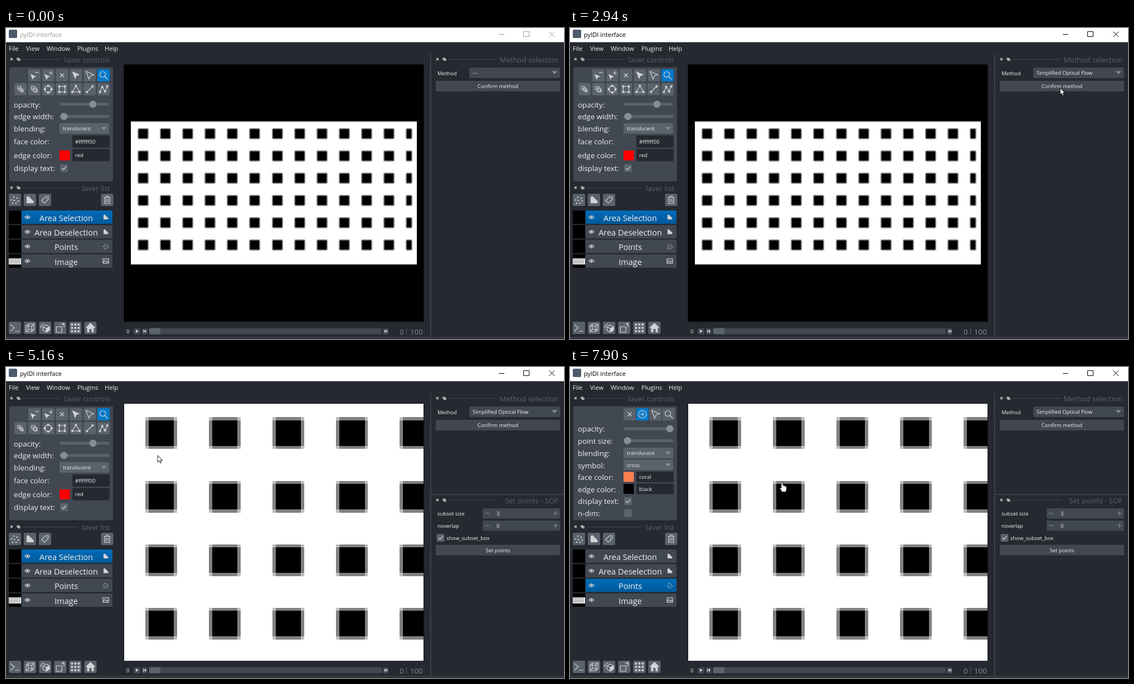
Recreate the animation shown at these times as an HTML page. Size 1001 by 559 pixels, loop 8000 ms.

```html
<!DOCTYPE html>
<html lang="en">
<head>
<meta charset="utf-8">
<title>pyIDI interface</title>
<style>
  html, body { margin: 0; width: 100%; height: 100%; overflow: hidden; background: #262930; }
  svg { display: block; width: 1001px; height: 559px; }
  text { font-family: "Open Sans", "Noto Sans", sans-serif; fill: #f0f1f2; white-space: pre; }
  .line { fill: none; stroke: #d1d2d4; stroke-width: 1.2; }
  .solid { fill: #d1d2d4; }
  .off { display: none; }
</style>
</head>
<body>
<svg id="stage" viewBox="0 0 1001 559"></svg>
<script>
const BG = '#262930', PANEL = '#414851', BUTTON = '#5a626c', KNOB = '#868e93', ACTIVE = '#007acc';
const SMALL = 9.5, LABEL = 13.3, TITLE = 13.1, MENU = 11.1;

const rect = (x, y, w, h, fill, extra = '') =>
  `<rect x="${x}" y="${y}" width="${w}" height="${h}" fill="${fill}" ${extra}/>`;
const box = (x, y, w, h, fill, extra = '') => rect(x, y, w, h, fill, `rx="2" ${extra}`);
const text = (x, y, size, label, extra = '') =>
  `<text x="${x}" y="${y}" font-size="${size}" ${extra}>${label}</text>`;
const centred = (x, y, size, label) => text(x, y, size, label, 'text-anchor="middle"');
const line = (d, extra = '') => `<path class="line" d="${d}" ${extra}/>`;
const solid = (d, extra = '') => `<path class="solid" d="${d}" ${extra}/>`;
const at = (x, y, content, scale = 1) => `<g transform="translate(${x} ${y}) scale(${scale})">${content}</g>`;
const group = (id, content) => `<g id="${id}">${content}</g>`;
const nodes = (...points) => points.map(([x, y]) =>
  `<rect class="solid" x="${x - 1.8}" y="${y - 1.8}" width="3.6" height="3.6"/>`).join('');
const dots = (r, ...points) => points.map(([x, y]) =>
  `<circle class="solid" cx="${x}" cy="${y}" r="${r}"/>`).join('');

const ARROW = 'M-7 -7L7 -1 1 1 -1.5 7Z';
const corners = [[-5, -5], [5, -5], [-5, 5], [5, 5]];
const icon = {
  remove: solid(ARROW, 'transform="translate(-2 3) scale(.75)"') + line('M1 -5H8'),
  insert: solid(ARROW, 'transform="translate(-2 3) scale(.75)"') + line('M1 -4H8M4.500 -7.500V-.5'),
  cross: line('M-3.500 -3.500L3.500 3.500M3.500 -3.500L-3.500 3.500', 'stroke-width="1.5"'),
  arrow: solid(ARROW),
  outline: line(ARROW),
  zoom: '<circle class="line" cx="-1.500" cy="-1.500" r="5"/>' + line('M2 2L7.500 7.500', 'stroke-width="1.8"'),
  stack: line('M-5 -5H0V0H-5ZM-2 -2H3V3H-2ZM1 1H5V5H1Z', 'stroke-width="1"'),
  stackBack: line('M-5 -5H1V1H-5ZM-2 -2H4V4H-2ZM4 0H5V5H0V4', 'stroke-width="1"'),
  ellipse: '<circle class="line" r="6"/>' + nodes([0, -6], [6, 0], [0, 6], [-6, 0]),
  square: line('M-5 -5H5V5H-5Z') + nodes(...corners),
  triangle: line('M0 -6L6.500 5H-6.500Z') + nodes([0, -6], [6.500, 5], [-6.500, 5]),
  segment: line('M-5 5L5 -5') + nodes([-5, 5], [5, -5]),
  path: line('M-6.500 5L-2.500 -4 2.500 4 6.500 -5') + nodes([-6.500, 5], [-2.500, -4], [2.500, 4], [6.500, -5]),
  add: '<circle class="line" r="7"/>' + line('M-4 0H4M0 -4V4'),
  points: dots(1.3, [-6, 0], [-2, -5], [-1, 1], [4, -3], [6, 2], [2, 6], [-4, 6]),
  shape: solid('M-6 -5L-3 -7 7 3 6 6H-6Z'),
  tag: line('M-6 1L1 -6 6 -6 6 -1 -1 6Z') + dots(1.1, [3, -3]),
  trash: line('M-6 -4.500H6M-2 -4.500V-7H2V-4.500M-4.500 -4.500V6.500H4.500V-4.500M-1.500 -2V4M1.500 -2V4'),
  eye: line('M-4.500 0Q0 -5.500 4.500 0Q0 5.500 -4.500 0Z', 'stroke-width="1"') + dots(1.7, [0, 0]),
  picture: line('M-5 -4H5V4H-5ZM-5 3L-1.500 -1 1 2 3 0 5 2', 'stroke-width="1"'),
  prompt: line('M-8 -6L-1 0 -8 6M0 6H8', 'stroke-width="2"'),
  cube: line('M-7 -3L-3 -7H7V3L3 7H-7ZM-7 -3H3V7M3 -3L7 -7M-3 -7V3H7M-7 7L-3 3', 'stroke-width="1.6"'),
  roll: line('M-4 -2L2 -5 8 -2V4L2 8 -4 4ZM-4 -2L2 1 8 -2M2 1V8M-8 0Q-8 -7 -1 -7') + solid('M2 1L8 -2V4L2 8Z'),
  transpose: line('M-7 -2H3V8H-7Z', 'stroke-width="2"') + line('M1 -7H7V-1M5 -9L7 -7 5 -5'),
  grid: [-6, 0, 6].map(y => nodes([-6, y], [0, y], [6, y])).join(''),
  home: solid('M0 -9L9 0H6V8H2V2H-2V8H-6V0H-9Z'),
};
const button = (x, y, name, fill = BUTTON) => box(x - 11, y - 11, 22, 22, fill) + at(x, y, icon[name]);

const label = (y, name) => text(14, y, LABEL, name);
const slider = (y, x) => box(96, y - 2.500, 89, 5, BUTTON) + `<circle cx="${x}" cy="${y}" r="6.500" fill="${KNOB}"/>`;
const caret = (x, y) => `<path d="M${x - 5} ${y - 2.500}h10l-5 5.500z" fill="${KNOB}"/>`;
const combo = (y, value) => box(96, y - 9.500, 89, 19, BUTTON) + text(102, y + 3.500, SMALL, value) + caret(175.5, y);
const field = (y, value, h) => box(119, y - h / 2, 67, h, BG) + text(124, y + 3.500, SMALL, value);
const swatch = (y, fill) => rect(96, y - 9, 18.5, 18, fill);
const checkbox = (x, y, on) => box(x - 7, y - 7, 14, 14, BUTTON) +
  (on ? line(`M${x - 4} ${y}l3 3 5 -6`, 'stroke-width="1.700"') : '');

// The strip below the baseline hides the descenders, as the narrow title bar does.
const dockTitle = (x, y, lineEnd, right, name) =>
  line(`M${x - 2} ${y - 2}l4 4m0 -4l-4 4`) +
  line(`M${x + 10} ${y - 2}h3v3h-3zm2 1.500h3v3h-3z`, 'stroke-width=".9"') +
  rect(x + 20, y, lineEnd - x - 20, 1, PANEL) +
  text(right, y + 6, TITLE, name, `text-anchor="end" style="fill:${BUTTON}"`) +
  rect(lineEnd, y + 6.500, right - lineEnd + 2, 5, BG);

const windowFrame = rect(0, 0, 1001, 559, BG) + rect(0, 0, 1001, 25.5, '#fff') +
  box(5, 3, 15, 15, '#4d5b6c') +
  group('titleBar', text(25, 15.5, MENU, 'pyIDI interface', 'style="fill:inherit"') +
    '<path fill="none" d="M884 11.500H894M928.5 6.500H938.5V15.500H928.5ZM974.5 6.500L984 16M984 6.500L974.5 16"/>') +
  [[5, 'File'], [36, 'View'], [73, 'Window'], [128, 'Plugins'], [177, 'Help']]
    .map(([x, name]) => text(x, 41, MENU, name)).join('') +
  rect(761, 47, 1.500, 508, PANEL) + rect(0, 555.5, 1001, 1.500, PANEL);

const shapeTools = [51, 76, 100.5, 125.5, 150.5].map((x, i) =>
    button(x, 85, ['remove', 'insert', 'cross', 'arrow', 'outline'][i])).join('') +
  button(175, 85, 'zoom', ACTIVE) +
  ['stack', 'stackBack', 'ellipse', 'square', 'triangle', 'segment', 'path']
    .map((name, i) => button(26 + i * 24.85, 110, name)).join('');

const shapeControls = shapeTools +
  label(142.5, 'opacity:') + slider(137, 156) +
  label(164, 'edge width:') + slider(159, 104) +
  label(186, 'blending:') + combo(180.5, 'translucent') +
  label(209, 'face color:') + field(204, '#ffffff00', 22) +
  label(234, 'edge color:') + swatch(229, '#f00') + field(228.5, 'red', 22) +
  label(257, 'display text:') + checkbox(104, 252, true);

const pointControls = button(107, 85, 'cross') + button(153.5, 85, 'outline') +
  group('panMode', button(130, 85, 'add') + button(177, 85, 'zoom', ACTIVE)) +
  group('addMode', button(130, 85, 'add', ACTIVE) + button(177, 85, 'zoom')) +
  label(116, 'opacity:') + slider(111, 179) +
  label(137.5, 'point size:') + slider(132.5, 103) +
  label(159.5, 'blending:') + combo(154.5, 'translucent') +
  label(181.5, 'symbol:') + combo(176, 'cross') +
  label(203, 'face color:') + swatch(197.5, '#ff7f50') + field(197.5, 'coral', 19) +
  label(224.5, 'edge color:') + swatch(219, '#000') + field(219, 'black', 19) +
  label(246, 'display text:') + checkbox(104, 241, true) +
  label(268, 'n-dim:') + checkbox(104, 262.5, false);

const layers = [['Area Selection', 'shape'], ['Area Deselection', 'shape'], ['Points', 'points'], ['Image', 'picture']];
const layerList = layers.map(([name, kind], i) => {
  const y = 328 + i * 26.3;
  return rect(5, y, 22, 24, '#000') + box(28, y, 163, 24, PANEL, `id="row${i}"`) +
    at(38.5, y + 12, icon.eye) + centred(108, y + 18.7, 14.5, name) +
    at(179, y + 12, icon[kind], kind === 'picture' ? 1 : .68);
}).join('') +
  rect(5, 414, 22, 11, '#fff') +
  '<path d="M6 415.500H26M6 418H26M6 420.500H26M6 423H26" stroke="#000" stroke-dasharray="1 .8"/>' +
  rect(47.5, 384.5, 122, 17.5, 'none', 'id="focus" stroke="#4f9fd8"');

const leftDock = dockTitle(10, 56, 98, 187, 'layer controls') + box(6, 70.5, 186, 205, PANEL) +
  group('shapeControls', shapeControls) + group('pointControls', pointControls) +
  dockTitle(10, 287, 129, 187, 'layer list') +
  button(16, 309, 'points') + button(43, 309, 'shape') + button(70, 309, 'tag') + button(181.5, 309, 'trash') +
  layerList +
  ['prompt', 'cube', 'roll', 'transpose', 'grid', 'home']
    .map((name, i) => button(16 + i * 27.1, 539, name)).join('');

const square = (x, y, w) => rect(x, y, w, 10, '#c0c0c0') +
  rect(x, y + 1, w, 8, '#808080') + rect(x + 1, y, w - 2, 10, '#808080') + rect(x + 1, y + 1, w - 2, 8, '#000');
let squares = '';
for (let row = 0; row < 6; row++)
  for (let col = 0; col < 13; col++)
    squares += square(6 + col * 20, 6 + row * 20, col < 12 ? 10 : 6);

const viewer = '<clipPath id="canvas"><rect x="212" y="66" width="537" height="462"/></clipPath>' +
  rect(211.5, 65.5, 538, 462.5, '#000') +
  `<g clip-path="url(#canvas)"><g id="image" shape-rendering="crispEdges">${rect(0, 0, 256, 128, '#fff')}${squares}</g></g>` +
  text(216, 549, SMALL, '0') +
  box(229, 540, 12, 11, PANEL) + solid('M233 542l5 3-5 3z') +
  box(244, 540, 10, 11, PANEL) + solid('M251 542v6l-4-3zM246 542h1v6h-1z') +
  box(256, 539.5, 418, 11, PANEL) + box(257, 539.5, 20, 11, BUTTON) +
  box(676, 540, 10, 11, PANEL) + solid('M679 542v6l4-3zM683 542h1v6h-1z') +
  text(706, 550.5, LABEL, '0', `style="fill:${KNOB}"`) + rect(718, 540, 1, 11, BUTTON) +
  text(725, 550.5, LABEL, '100', `style="fill:${KNOB}"`);

const wideButton = (y, name) => box(771, y, 223, 19, PANEL) + centred(882.5, y + 13, SMALL, name);
const spin = (y, value) => box(855, y - 9, 139, 18.5, PANEL) + text(880, y + 4, SMALL, value) +
  line(`M859 ${y}h8M982 ${y}h8m-4 -4v8`, `style="stroke:${KNOB}"`);

const methods = ['---', 'Simplified Optical Flow', 'Lucas-Kanade'];
const rightDock = dockTitle(774, 56, 881, 991, 'Method selection') +
  text(774, 84.5, SMALL, 'Method') + box(831, 71, 163, 19, PANEL) + caret(984, 80) +
  text(837, 84.3, SMALL, methods[0], 'id="method"') + wideButton(95, 'Confirm method') +
  group('popup', rect(830, 90, 166, 40, '#1e2026') + rect(831, 90, 163, 37.5, '#2a2d34') +
    rect(831, 90, 163, 12.5, '#7f8184', 'id="choice"') +
    methods.map((name, i) => text(834, 99.3 + i * 12.5, SMALL, name)).join('')) +
  group('pointsDock', rect(763, 228.5, 238, 1.500, PANEL) + dockTitle(774, 239, 882, 991, 'Set points - SOF') +
    text(774, 266.5, SMALL, 'subset size') + spin(263, '3') +
    text(774, 289, SMALL, 'noverlap') + spin(285, '0') +
    checkbox(779.5, 307, true) + text(790, 310.7, SMALL, 'show_subset_box') + wideButton(319.5, 'Set points'));

const pointers =
  group('arrow', '<path d="M0 0V12L2.800 9.400 4.700 13.700 6.700 12.800 4.900 8.700H8.600Z" fill="#fff" stroke="#000" stroke-width=".9"/>') +
  group('hand', '<path d="M3 1.500Q4.500 -.5 6 1.500V6Q8 5 8.500 6.800 10.500 6 11 7.800 13 7.500 12.500 10V13L11 17.500H4.500L.5 11.500Q0 9 3 11Z" fill="#fff" stroke="#000" stroke-width=".8"/>');

const gradient = '<linearGradient id="selected" x2="0" y2="1"><stop stop-color="#006cb8"/><stop offset="1" stop-color="#005a9c"/></linearGradient>';
document.getElementById('stage').innerHTML =
  gradient + windowFrame + leftDock + viewer + rightDock + pointers;

// [time, x, y]
const pointerPath = [
  [200, 965, 541], [500, 958, 300], [800, 938, 90], [900, 935, 73], [1100, 935, 77], [1400, 932, 84],
  [1820, 920, 108], [1920, 919, 112], [2020, 917, 116], [2220, 917, 116], [2420, 914, 108],
  [2620, 914, 108], [2940, 877, 108], [3740, 877, 108], [3840, 894, 102], [4040, 620, 200],
  [4240, 355, 290], [4560, 355, 290], [4760, 352, 158], [5060, 352, 158], [5160, 272, 159],
  [5360, 70, 320], [5460, 35, 363], [5560, 76, 385], [5660, 109, 392], [5980, 109, 392],
  [6280, 128, 210], [6580, 131, 84], [6780, 131, 84], [7080, 220, 125], [7480, 371, 201],
  [7580, 373, 203], [7700, 375, 206], [7900, 376, 207],
];
// [time, scale, left, top]
const viewPath = [
  [4160, 2.004, 224, 168], [4560, 3.05, 157.8, 104], [4760, 3.05, 157.8, 104], [5060, 5.705, -12.5, 56.2],
];

function between(keys, time) {
  const next = keys.findIndex(key => key[0] > time);
  if (next < 0) return [keys.at(-1), keys.at(-1), 0];
  if (next === 0) return [keys[0], keys[0], 0];
  const [a, b] = [keys[next - 1], keys[next]];
  return [a, b, (time - a[0]) / (b[0] - a[0])];
}
const mix = (a, b, u) => a + (b - a) * u;

// The screen refreshes every 100 ms, with five refreshes taking 20 ms longer.
function snap(time) {
  const drift = 20 * [1500, 3000, 4200, 5900, 7600].filter(late => time >= late).length;
  return Math.floor((time - drift) / 100) * 100 + drift;
}

const $ = id => document.getElementById(id);
const show = (id, on) => $(id).classList.toggle('off', !on);

function render(time) {
  const now = snap(time);
  const [from, to, u] = between(pointerPath, now);
  const x = mix(from[1], to[1], u), y = mix(from[2], to[2], u);
  const add = time >= 6680, points = time >= 5860;
  const hand = add && x > 212;
  show('arrow', time >= 200 && !hand);
  show('hand', hand);
  $(hand ? 'hand' : 'arrow').setAttribute('transform', `translate(${x} ${y})`);

  const [a, b, v] = between(viewPath, now);
  const scale = a[1] * (b[1] / a[1]) ** v;
  const w = a[1] === b[1] ? 0 : (scale - a[1]) / (b[1] - a[1]);
  $('image').setAttribute('transform', `translate(${mix(a[2], b[2], w)} ${mix(a[3], b[3], w)}) scale(${scale})`);

  const ink = time < 1100 ? '#999' : '#000';
  $('titleBar').setAttribute('fill', ink);
  $('titleBar').setAttribute('stroke', 'none');
  $('titleBar').lastChild.setAttribute('stroke', ink);

  show('popup', time >= 1200 && time < 2620);
  const row = Math.min(2, Math.max(0, Math.floor((y - 90) / 12.5)));
  $('choice').setAttribute('y', 90 + row * 12.5);
  $('method').textContent = methods[time < 2620 ? 0 : 1];
  show('pointsDock', time >= 3140);

  show('shapeControls', !points);
  show('pointControls', points);
  show('panMode', !add);
  show('addMode', add);
  show('focus', points && !add);
  $('row0').setAttribute('fill', points ? PANEL : 'url(#selected)');
  $('row2').setAttribute('fill', !points ? PANEL : time < 6180 ? '#0070c0' : 'url(#selected)');
}

const start = performance.now();
function frame() {
  render((performance.now() - start) % 8000);
  requestAnimationFrame(frame);
}
frame();
</script>
</body>
</html>
```
